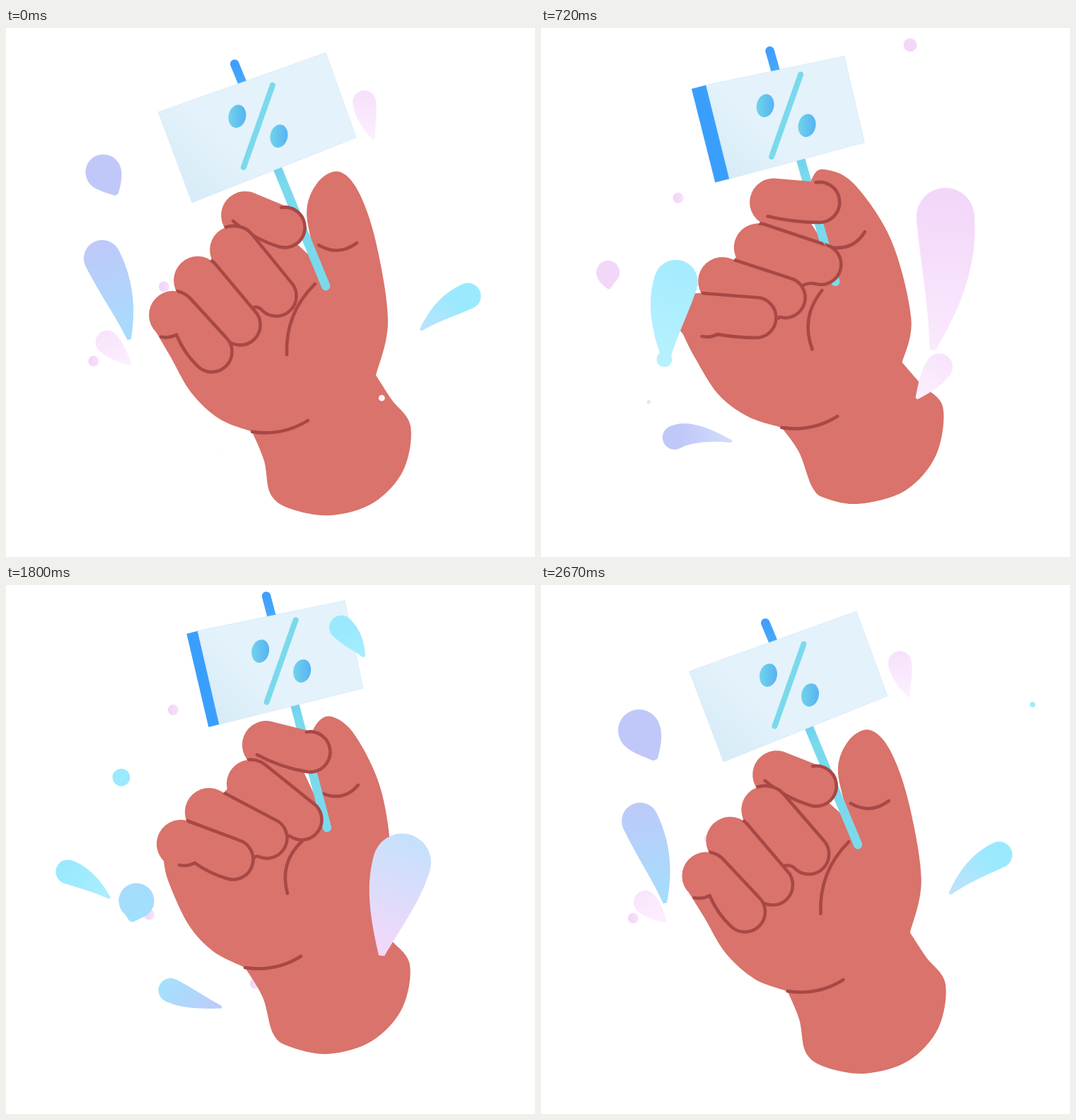
Animation, 748 px wide and 748 px high, one loop 2700 ms. Source, as an HTML page with a canvas:

```html
<!DOCTYPE html>
<html lang="en">
<head>
<meta charset="utf-8">
<title>Hand with a percent sign</title>
<style>
html, body { margin: 0; height: 100%; overflow: hidden; background: #fff; }
canvas { display: block; width: 100%; height: 100%; }
</style>
</head>
<body>
<canvas id="stage" width="748" height="748"></canvas>
<script>
const LOOP = 2700, SWAY = LOOP / 2, DROP_LIFE = 1300, SPECK_LIFE = 650;
const SKIN = '#d9736b', LINE = '#a84846';
const KNUCKLE = 34, TIP = 28.5;
const ctx = document.getElementById('stage').getContext('2d');

// Hand: three poses a third of a sway apart, mixed by a pure sine wave.
const body = [ // thumb, wrist, side of the palm
  [440,332, 425,262, 440,219, 470,203, 498,231, 523,303, 540,415, 523,491, 545,525, 572,563,
   562,625, 520,671, 460,689, 403,680, 374,659, 365,612, 348,571, 302,553, 262,516, 232,464],
  [440,305, 426,242, 437,200, 460,186, 494,213, 531,292, 544,400, 522,472, 544,501, 571,537,
   560,599, 517,645, 456,663, 402,653, 378,635, 363,583, 338,541, 293,518, 258,480, 230,420],
  [401,335, 363,262, 371,221, 390,211, 430,230, 482,307, 516,420, 508,481, 537,515, 568,547,
   559,616, 516,667, 450,686, 405,680, 384,664, 366,616, 345,584, 297,573, 250,543, 214,495]
];
const web = [[412,306], [420,262], [368,298]];

// Fingers, index to little: knuckle centre, tip centre, end of the lower crease.
const fingers = [
  [[338,265, 394,282, 321,273], [368,226, 430,236, 355,240], [306,268, 369,268, 297,287]],
  [[322,314, 382,379, 349,395], [346,281, 418,332, 396,358], [286,332, 375,354, 338,384]],
  [[271,357, 331,420, 313,447], [287,321, 369,358, 350,386], [241,383, 323,413, 317,442]],
  [[236,406, 291,458, 241,434], [247,366, 321,388, 267,393], [214,437, 287,444, 234,461]]
];
const thumbCrease = [[442,307, 496,304], [449,295, 498,283], [396,319, 446,298]];
const palmCrease = [[437,362, 397,462], [420,361, 398,436], [398,374, 379,470]];

const board = [
  [215,119, 452,35, 495,155, 263,247],
  [271,65, 479,22, 505,146, 302,197],
  [200,107, 404,50, 440,170, 241,238]
];
const rimDepth = [[0], [1], [1]];
const stickEnd = [[452,365], [454,343], [405,372]];

// Drops fly from an emitter along a quadratic curve.
const LEFT = [177, 476], RIGHT = [531, 524], TOP = [520, 158], LOW = [305, 597];
const CYAN = ['#b8f1fe', '#9be9fe'], PINK = ['#fcf0fe', '#f3d7f9'], LILAC = ['#dde6fd', '#bfc8f9'];
const SKY = ['#9fe1fd', '#c0c8f9'], DAWN = ['#f5d7f9', '#9be9fe'], DUSK = ['#bccbfb', '#9be9fe'];
const drops = [ // emitter, birth, control point, end point, radius, colours
  [LEFT, 200, 170,320, 275,240, 31, CYAN],
  [LEFT, 600, 134,345, 163,272, 26, CYAN],
  [LEFT, 1000, 121,405, 58,399, 17, CYAN],
  [LEFT, 1570, 220,330, 137,203, 31, SKY],
  [LEFT, 1960, 175,370, 94,258, 26, SKY],
  [LEFT, 2350, 88,400, 95,343, 16.5, PINK],
  [RIGHT, -30, 604,332, 552,169, 41, PINK],
  [RIGHT, 340, 600,430, 632,368, 19, PINK],
  [RIGHT, 1390, 570,270, 695,169, 41, DAWN],
  [RIGHT, 1790, 575,400, 678,370, 18.5, DAWN],
  [TOP, 890, 520,95, 460,48, 17, CYAN],
  [TOP, 2240, 490,75, 522,24, 16.5, PINK],
  [LOW, -10, 180,548, 172,604, 17, LILAC],
  [LOW, 1330, 182,568, 177,512, 17, DUSK]
];
const specks = [ // birth, start, end
  [100, 336,481, 152,529], [340, 354,309, 161,226], [900, 240,350, 112,328], [960, 350,560, 192,593],
  [1040, 225,440, 81,412], [1580, 320,215, 172,147], [1640, 260,462, 127,471], [1760, 382,556, 140,616],
  [1950, 260,305, 78,256], [2560, 158,471, 70,471], [2580, 290,335, 93,426]
];

const clamp = v => Math.min(Math.max(v, 0), 1);
const ease = v => { const c = clamp(v); return c * c * (3 - 2 * c); };
const age = (t, birth) => ((t - birth) % LOOP + LOOP) % LOOP;

function mixer(t) {
  const w = [0, 1, 2].map(k => (1 + 2 * Math.cos(2 * Math.PI * (t / SWAY - k / 3))) / 3);
  return poses => poses[0].map((_, i) => w.reduce((sum, v, k) => sum + v * poses[k][i], 0));
}

function gradient(x0, y0, x1, y1, [from, to], end = 1) {
  const g = ctx.createLinearGradient(x0, y0, x0 + (x1 - x0) * end, y0 + (y1 - y0) * end);
  g.addColorStop(0, from);
  g.addColorStop(1, to);
  return g;
}

function disc(x, y, r, color) {
  ctx.fillStyle = color;
  ctx.beginPath();
  ctx.arc(x, y, r, 0, 7);
  ctx.fill();
}

function polygon(points, color) {
  ctx.fillStyle = color;
  ctx.beginPath();
  points.forEach(p => ctx.lineTo(...p));
  ctx.closePath();
  ctx.fill();
}

function line(x0, y0, x1, y1, color, width, sag = 0) {
  const len = Math.hypot(x1 - x0, y1 - y0);
  ctx.strokeStyle = color;
  ctx.lineWidth = width;
  ctx.beginPath();
  ctx.moveTo(x0, y0);
  ctx.quadraticCurveTo((x0 + x1) / 2 - (y1 - y0) / len * sag, (y0 + y1) / 2 + (x1 - x0) / len * sag, x1, y1);
  ctx.stroke();
}
const crease = (p, sag) => line(...p, LINE, 4.6, sag);

// Smooth curve through flat [x, y, ...] points.
function spline(path, p) {
  const n = p.length / 2;
  const at = i => { const k = 2 * Math.min(Math.max(i, 0), n - 1); return [p[k], p[k + 1]]; };
  path.lineTo(p[0], p[1]);
  for (let i = 0; i < n - 1; i++) {
    const [ax, ay] = at(i - 1), [bx, by] = at(i), [cx, cy] = at(i + 1), [dx, dy] = at(i + 2);
    path.bezierCurveTo(bx + (cx - ax) / 6, by + (cy - ay) / 6, cx - (dx - bx) / 6, cy - (dy - by) / 6, cx, cy);
  }
}

function drawSign(mix) {
  const f = mix(board), [depth] = mix(rimDepth), [ex, ey] = mix(stickEnd);
  const corners = [0, 2, 4, 6].map(i => [f[i], f[i + 1]]);
  const [tl, tr, br, bl] = corners;
  const cx = (f[0] + f[2] + f[4] + f[6]) / 4, cy = (f[1] + f[3] + f[5] + f[7]) / 4;
  const sx = ex + 1.39 * (cx + 3 - ex), sy = ey + 1.39 * (cy - ey);
  line(sx, sy, ex, ey, gradient(sx, sy, ex, ey, ['#3f9ffc', '#7adaec'], 0.55), 12.5);

  const rim = ([x, y]) => [x - 15.5 * depth, y + 4 * depth];
  if (depth > 0) polygon([rim(tl), tl, bl, rim(bl)], '#3a9ffc');
  polygon(corners, gradient(...bl, ...tr, ['#d6ecf7', '#e4f2fb'], 0.35));
  ctx.strokeStyle = '#d3e9f8';
  ctx.lineWidth = 0.7;
  ctx.stroke();

  line(cx + 20.5, cy - 58, cx - 20.5, cy + 58, '#7bd9ec', 8);
  for (const side of [-1, 1]) {
    const x = cx + 29.5 * side, y = cy + 14 * side;
    ctx.fillStyle = gradient(x - 12, y, x + 12, y, ['#70d3ea', '#58b3f3']);
    ctx.beginPath();
    ctx.ellipse(x, y, 12.3, 16.5, 0.2, 0, 7);
    ctx.fill();
  }
}

// A finger is a capsule; its edge runs over the knuckle, round the tip and back along the crease.
function fingerPaths([kx, ky, tx, ty, ex, ey], isIndex) {
  const a = Math.atan2(ty - ky, tx - kx), up = a - Math.PI / 2, down = a + Math.PI / 2;
  const fill = new Path2D(), edge = new Path2D();
  fill.arc(kx, ky, KNUCKLE, down, up + 2 * Math.PI);
  fill.arc(tx, ty, TIP, up, down);
  fill.closePath();

  if (!isIndex) edge.arc(kx, ky, KNUCKLE, a - Math.PI, up);
  edge.arc(tx, ty, TIP, isIndex ? -1.75 : up, down);
  const x = tx + TIP * Math.cos(down), y = ty + TIP * Math.sin(down), half = Math.hypot(ex - x, ey - y) / 2;
  edge.quadraticCurveTo(x - half * Math.cos(a), y - half * Math.sin(a), ex, ey);
  return { fill, edge };
}

function drawHand(mix) {
  const b = mix(body), shapes = fingers.map(mix);
  const [index, little] = [shapes[0], shapes[3]];
  const solid = new Path2D();
  spline(solid, b.slice(0, 16));
  spline(solid, b.slice(14, 34));
  spline(solid, [...b.slice(32), little[0] - 24, little[1] + 24]);
  solid.lineTo(index[0], index[1]);
  solid.lineTo(...mix(web));
  solid.closePath();
  ctx.fillStyle = SKIN;
  ctx.fill(solid);

  const [wx, wy] = b.slice(32);
  crease([wx, wy, wx + 79, wy - 16], 15);
  crease(mix(thumbCrease), 18);
  crease(mix(palmCrease), 24);
  drawSign(mix);

  shapes.forEach((shape, i) => {
    const { fill, edge } = fingerPaths(shape, i === 0);
    ctx.fillStyle = SKIN;
    ctx.fill(fill);
    // edges show only against the skin behind them
    ctx.save();
    if (i > 0) ctx.clip(solid);
    ctx.strokeStyle = LINE;
    ctx.lineWidth = 4.6;
    ctx.stroke(edge);
    ctx.restore();
    solid.addPath(fill);
  });
  const [x, y] = little.slice(4);
  crease([x, y, x - 22, y + 3], -4);
}

function drawDrop([[sx, sy], birth, cx, cy, ex, ey, size, colors], t) {
  const u = age(t, birth) / DROP_LIFE;
  if (u >= 1) return;
  const r = size * Math.min(1, u / 0.22, (1 - u) / 0.16);
  const head = ease(u / 0.9), tail = ease((u - 0.42) / 0.58);
  const curve = (q, s, c, e) => (1 - q) * (1 - q) * s + 2 * q * (1 - q) * c + q * q * e;
  const slope = (q, s, c, e) => (1 - q) * (c - s) + q * (e - c);
  const color = gradient(sx, sy, ex, ey, colors, 0.8);
  const outline = [], steps = 14;
  for (let i = 0; i <= steps; i++) {
    const s = i / steps, q = tail + (head - tail) * s;
    const x = curve(q, sx, cx, ex), y = curve(q, sy, cy, ey);
    const dx = slope(q, sx, cx, ex), dy = slope(q, sy, cy, ey);
    const w = r * (0.1 + 0.9 * Math.sin(s * Math.PI / 2)) / Math.hypot(dx, dy);
    outline.push([x - dy * w, y + dx * w]);
    outline.unshift([x + dy * w, y - dx * w]);
  }
  polygon(outline, color);
  disc(curve(head, sx, cx, ex), curve(head, sy, cy, ey), r, color);
}

function drawSpeck([birth, x0, y0, x1, y1], t) {
  const u = age(t, birth) / SPECK_LIFE;
  if (u >= 1) return;
  const p = u * (2 - u), x = x0 + (x1 - x0) * p, y = y0 + (y1 - y0) * p;
  disc(x, y, 7.5 * Math.min(1, (1 - u) * 8), gradient(x - 8, y, x + 8, y, ['#f0d2f8', '#f8e3fb']));
}

function draw(t) {
  ctx.fillStyle = '#fff';
  ctx.fillRect(0, 0, 748, 748);
  ctx.lineCap = ctx.lineJoin = 'round';
  specks.forEach(s => drawSpeck(s, t));
  drawHand(mixer(t));
  drops.forEach(d => drawDrop(d, t));
}

const start = performance.now();
function tick() {
  draw((performance.now() - start) % LOOP);
  requestAnimationFrame(tick);
}
tick();
</script>
</body>
</html>
```
